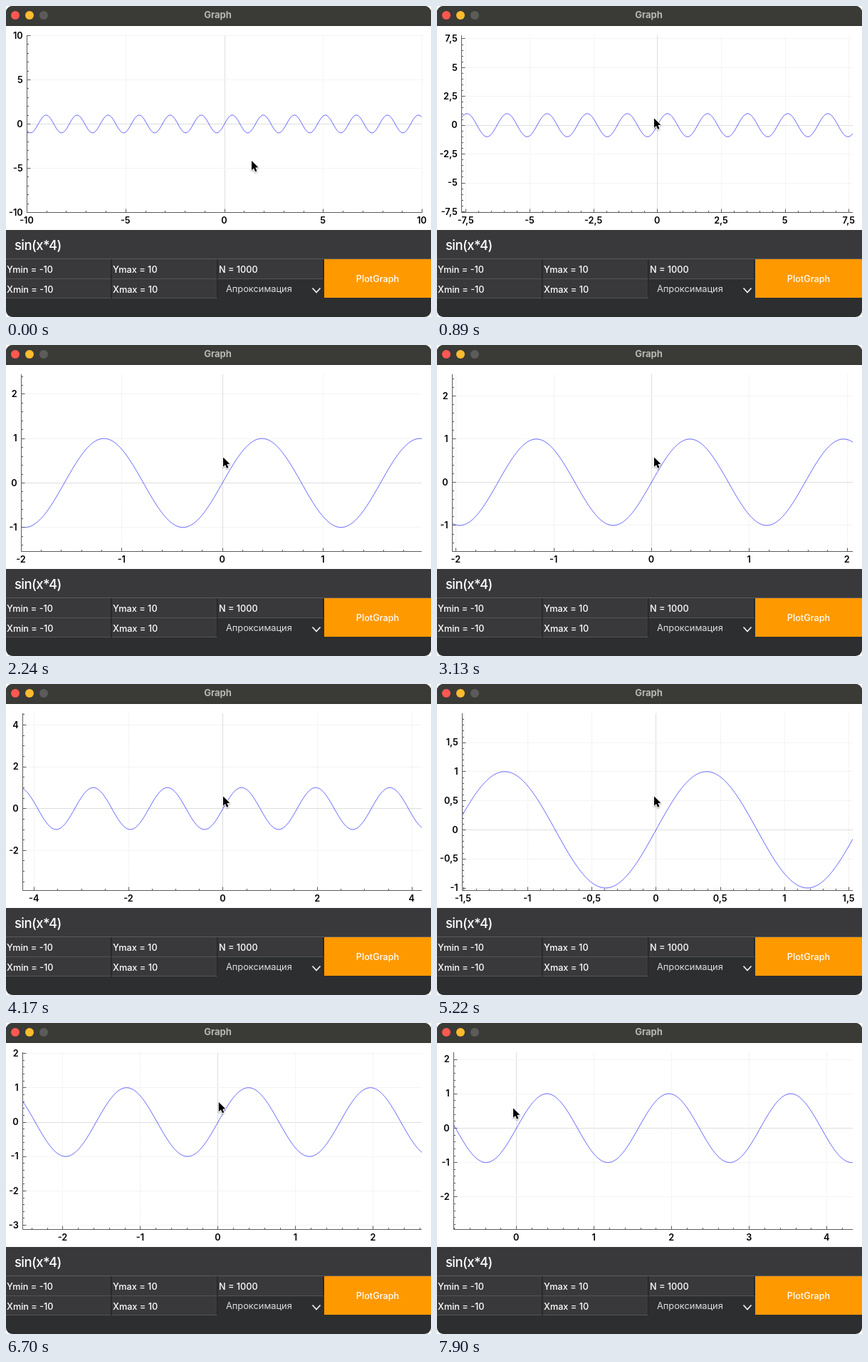
Animation, 597 px wide and 436 px high, one loop 8000 ms. Source, as an HTML page with a canvas:

```html
<!DOCTYPE html>
<html lang="ru">
<head>
<meta charset="utf-8">
<title>Graph</title>
<style>
  html, body { margin: 0; width: 100%; height: 100%; overflow: hidden; background: #fff; }
  .window {
    position: relative; width: 597px; height: 436px; overflow: hidden;
    border-radius: 9px; background: #2d2e2f; color: #fff;
    font: 500 12.7px Inter, "Open Sans", sans-serif;
  }
  .window > * { position: absolute; box-sizing: border-box; white-space: pre; }
  .title {
    left: 0; top: 0; width: 597px; height: 28px; padding-right: 2px; background: #3a3a37;
    border-bottom: 1px solid #2f2f2d; color: #b7b7b4;
    font-size: 13px; font-weight: 700; line-height: 25px; text-align: center;
  }
  .light { top: 7px; width: 12px; height: 12px; border-radius: 50%; }
  canvas { left: 0; top: 28px; width: 597px; height: 286px; }
  .formula {
    left: 0; top: 314px; width: 597px; height: 41px; padding-left: 12px;
    background: #39393b; border-bottom: 1px solid #5b5b5c;
    font-size: 18.5px; line-height: 43px; letter-spacing: -.6px;
  }
  .caret { left: 77px; top: 326px; width: 1px; height: 18px; background: #fff; }
  .field {
    height: 28px; width: 148px; padding-left: 1px; line-height: 29px;
    background: #39393b; border-bottom: 1px solid #545455; border-right: 1px solid #242425;
  }
  .lower { height: 27px; }
  .combo {
    left: 297px; top: 383px; width: 148px; height: 27px; padding-left: 12px;
    background: #2d2e2f; color: #dededf;
    font-size: 12.8px; font-weight: 400; line-height: 27px;
  }
  .combo svg { position: absolute; left: 132px; top: 11px; }
  .button {
    left: 447px; top: 355px; width: 150px; height: 54px; background: #f90;
    line-height: 55px; text-align: center;
  }
</style>
</head>
<body>
<div class="window">
  <div class="title">Graph</div>
  <i class="light" style="left:7px;background:#fe5850"></i>
  <i class="light" style="left:27px;background:#fdbc2e"></i>
  <i class="light" style="left:47px;background:#5b5b59"></i>
  <canvas></canvas>
  <div class="formula">sin(x*4)</div>
  <i class="caret"></i>
  <div class="field" style="left:0;top:355px">Ymin = -10</div>
  <div class="field" style="left:149px;top:355px">Ymax = 10</div>
  <div class="field" style="left:298px;top:355px">N = 1000</div>
  <div class="field lower" style="left:0;top:383px">Xmin = -10</div>
  <div class="field lower" style="left:149px;top:383px">Xmax = 10</div>
  <div class="combo">Апроксимация<svg width="14" height="10" fill="none" stroke="#eee" stroke-width="1.8"><path d="M1.5 1.5 7 7.5 12.5 1.5"/></svg></div>
  <div class="button">PlotGraph</div>
</div>
<script>
const LOOP = 8000, STEP = 149.05;
const TOP = 41, BOTTOM = 289, RIGHT = 584, HEIGHT = BOTTOM - TOP;
const CANVAS_TOP = 28, CANVAS_HEIGHT = 286;
const ANCHOR_Y = 0.57;   // graph value that stays under the pointer

const canvas = document.querySelector('canvas');
const caret = document.querySelector('.caret');
const ctx = canvas.getContext('2d');
const ratio = window.devicePixelRatio || 1;
canvas.width = 597 * ratio;
canvas.height = CANVAS_HEIGHT * ratio;

// Keys are [time, value]
const SPAN = [[600, 20], [1490, 8.96], [2560, 2.8], [3130, 4.1], [4170, 8.45],
  [4300, 8.9], [5220, 3.03], [5450, 2.75], [6200, 5.147]]
  .map(([time, span]) => [time, Math.log(span)]);
const CENTER = [[600, 0], [1490, -.024], [3130, .011], [4170, -.015],
  [5220, .012], [6400, 0], [6700, .045], [7900, 1.764]];
const MOUSE_X = [[0, 345], [447, 305], [6400, 305], [6700, 300], [7900, 107]];
const MOUSE_Y = [[0, 217], [447, 157.5], [6400, 157.5], [6700, 111], [7900, 119.5]];

function track(keys, t) {
  const next = keys.findIndex(key => key[0] > t);
  if (next === 0) return keys[0][1];
  if (next < 0) return keys[keys.length - 1][1];
  const [t0, a] = keys[next - 1], [t1, b] = keys[next];
  return a + (b - a) * (t - t0) / (t1 - t0);
}

// Readable tick step for about five intervals
function tickStep(span) {
  const raw = span / 5, power = 10 ** Math.floor(Math.log10(raw)), mantissa = raw / power;
  const nice = [1, 2, 2.5, 5, 10].reduce((best, n) =>
    Math.abs(n - mantissa) < Math.abs(best - mantissa) ? n : best);
  return { step: nice * power, parts: nice === 2 ? 4 : 5 };
}

function ticks(min, max, step) {
  const list = [], slack = step * 1e-3;
  for (let i = Math.ceil((min - slack) / step); i * step <= max + slack; i++) list.push(i * step);
  return list;
}

const label = value => String(+value.toFixed(3)).replace('.', ',');
const crisp = value => Math.round(value) + .5;

function line(x1, y1, x2, y2) {
  ctx.beginPath();
  ctx.moveTo(x1, y1);
  ctx.lineTo(x2, y2);
  ctx.stroke();
}

function drawPointer(x, y) {
  ctx.save();
  ctx.translate(x, y);
  ctx.scale(.94, .94);
  ctx.beginPath();
  [[0, 0], [0, 14], [3.2, 11.2], [5.4, 16.3], [7.9, 15.2], [5.7, 10.2], [10, 9.9]]
    .forEach(point => ctx.lineTo(...point));
  ctx.closePath();
  ctx.lineJoin = 'round';
  ctx.lineWidth = 2;
  ctx.strokeStyle = '#fff';
  ctx.shadowColor = 'rgba(0,0,0,.35)';
  ctx.shadowBlur = 2 * ratio;
  ctx.shadowOffsetY = ratio;
  ctx.stroke();
  ctx.shadowColor = 'transparent';
  ctx.fillStyle = '#000';
  ctx.fill();
  ctx.restore();
}

function drawPlot(t) {
  const span = Math.exp(track(SPAN, t)), center = track(CENTER, t);
  const mouseX = track(MOUSE_X, t), mouseY = track(MOUSE_Y, t);
  const scaleY = HEIGHT / span;
  const zeroY = t < 600 ? 165 : mouseY + ANCHOR_Y * scaleY;
  const { step, parts } = tickStep(span);
  const yMin = (zeroY - BOTTOM) / scaleY, yMax = (zeroY - TOP) / scaleY;

  ctx.setTransform(ratio, 0, 0, ratio, 0, -CANVAS_TOP * ratio);
  ctx.fillStyle = '#fff';
  ctx.fillRect(0, CANVAS_TOP, 597, CANVAS_HEIGHT);
  ctx.font = '600 12.7px Inter, "Open Sans", sans-serif';

  // The left margin follows the widest label
  const yTicks = ticks(yMin, yMax, step);
  const widest = Math.max(...yTicks.map(v => ctx.measureText(label(v)).width));
  const left = Math.round(widest + 9.3), width = RIGHT - left;
  const scaleX = width / span;
  const toX = v => left + width / 2 + (v - center) * scaleX;
  const toY = v => zeroY - v * scaleY;
  const xMin = center - span / 2, xMax = center + span / 2;
  const xTicks = ticks(xMin, xMax, step);

  ctx.lineWidth = 1;
  const grid = (value, ...ends) => {
    const zero = Math.abs(value) < 1e-9;
    ctx.strokeStyle = zero ? '#dedede' : '#e9e9e9';
    ctx.setLineDash(zero ? [] : [1, 1]);
    line(...ends);
  };
  xTicks.forEach(v => grid(v, crisp(toX(v)), TOP, crisp(toX(v)), BOTTOM));
  yTicks.forEach(v => grid(v, left, crisp(toY(v)), RIGHT, crisp(toY(v))));
  ctx.setLineDash([]);

  ctx.save();
  ctx.beginPath();
  ctx.rect(left, TOP, width, HEIGHT);
  ctx.clip();
  ctx.beginPath();
  for (let x = left; x <= RIGHT; x += .5) {
    const value = center + (x - left - width / 2) / scaleX;
    ctx.lineTo(x + .4, toY(Math.sin(4 * value)) + .4);
  }
  ctx.strokeStyle = '#00f';
  ctx.lineWidth = .65;
  ctx.stroke();
  ctx.restore();

  const axisX = left + .5, axisY = BOTTOM + .5;
  ctx.strokeStyle = '#5c5c5c';
  line(axisX, TOP, axisX, axisY);
  line(axisX, axisY, RIGHT, axisY);
  const marks = (interval, length) => {
    ticks(xMin, xMax, interval).forEach(v => line(crisp(toX(v)), axisY, crisp(toX(v)), axisY - length));
    ticks(yMin, yMax, interval).forEach(v => line(axisX, crisp(toY(v)), axisX + length, crisp(toY(v))));
  };
  marks(step / parts, 2.5);
  marks(step, 5);

  ctx.fillStyle = '#000';
  ctx.textBaseline = 'alphabetic';
  ctx.textAlign = 'center';
  xTicks.forEach(v => ctx.fillText(label(v), toX(v), 304.5));
  ctx.textAlign = 'right';
  yTicks.forEach(v => ctx.fillText(label(v), left - 5.3, toY(v) + 4.7));

  drawPointer(mouseX, mouseY);
}

const start = performance.now();
function frame(now) {
  const time = Math.max(0, now - start) % LOOP;
  const t = Math.floor((time + 9) / STEP) * STEP;
  drawPlot(t);
  const blink = (t + 720) % 1000 < 500;
  caret.style.visibility = t > 200 && t < 6400 && blink ? 'visible' : 'hidden';
  requestAnimationFrame(frame);
}
frame(start);
</script>
</body>
</html>
```
